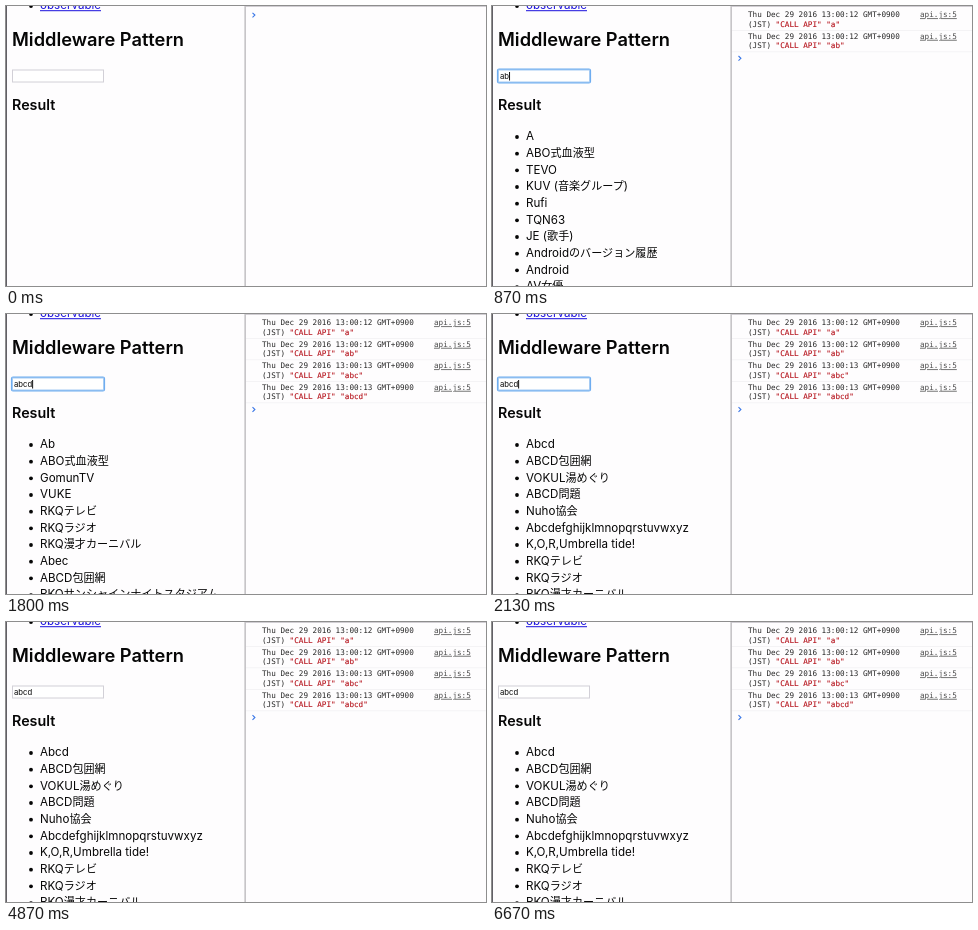
Animation of 480 by 280 pixels, one loop 6.74 s. Source, as an HTML page:

```html
<!DOCTYPE html>
<html lang="ja">
<head>
<meta charset="utf-8">
<title>Middleware Pattern</title>
<style>
html, body { margin: 0; width: 100%; height: 100%; overflow: hidden; background: #fefdfe; }
svg { display: block; width: 480px; height: 280px; }
text { font-family: Inter, "Noto Sans CJK JP", "Noto Sans CJK", sans-serif; fill: #060606; }
.head { font-weight: 600; }
.row { font-size: 11.1px; }
.latin { font-size: 11.6px; }
.field { font-size: 7.7px; }
.log { font-family: "DejaVu Sans Mono", monospace; font-size: 7.65px; fill: #262626; }
.str { fill: #b5121b; stroke: #b5121b; stroke-width: .12; }
.src { fill: #4c4c4c; text-decoration: underline; }
.link { fill: #1a10dc; }
</style>
</head>
<body>
<svg id="stage" viewBox="0 0 480 280">
  <defs>
    <filter id="soft" x="-10%" y="-40%" width="120%" height="180%"><feGaussianBlur stdDeviation=".5"/></filter>
  </defs>
  <rect width="480" height="280" fill="#fefdfe"/>
  <rect width="1" height="280" fill="#626066"/>
  <circle cx="25" cy="0" r="1.9"/>
  <text class="latin link" x="34" y="3.3">observable</text>
  <rect x="34" y="4.2" width="61" height="1" fill="#1a10dc"/>
  <text class="head" x="6" y="40" font-size="18.3">Middleware Pattern</text>
  <rect id="glow" x="5.8" y="63.3" width="92.4" height="13.4" rx="1.2" fill="none" stroke="#6fadf0" stroke-width="1.8" filter="url(#soft)"/>
  <rect id="box" x="6.5" y="64" width="91" height="12" fill="#fff"/>
  <text id="typed" class="field" x="8" y="73"></text>
  <rect id="caret" y="66" width="1" height="8.5" fill="#111"/>
  <text class="head" x="6" y="104.3" font-size="14.3">Result</text>
  <g id="lists"></g>
  <rect x="238.6" width="1" height="280" fill="#a3a1a5"/>
  <rect x="239" width="241" height=".8" fill="#c6c4c8"/>
  <g id="logs"></g>
  <path id="prompt" d="M246.5 6.8l2.4 2.3l-2.4 2.3" fill="none" stroke="#3b78e7" stroke-width="1.1"/>
</svg>
<script>
const LOOP = 6740, FOCUS = 130, BLUR = 4270, BLINK_FROM = 2270, BLINK = 500;
const WORD = "abcd";
const KEYS = [330, 730, 1130, 1470];
const RESULTS = [
  { at: 840, items: ["A", "ABO式血液型", "TEVO", "KUV (音楽グループ)", "Rufi", "TQN63", "JE (歌手)",
    "Androidのバージョン履歴", "Android", "AV女優"] },
  { at: 1330, items: ["Ab", "ABO式血液型", "GomunTV", "VUKE", "RKQテレビ", "RKQラジオ", "RKQ漫才カーニバル",
    "Abec", "ABCD包囲網", "RKQサンシャインナイトスタジアム"] },
  { at: 2000, items: ["Abcd", "ABCD包囲網", "VOKUL湯めぐり", "ABCD問題", "Nuho協会", "Abcdefghijklmnopqrstuvwxyz",
    "K,O,R,Umbrella tide!", "RKQテレビ", "RKQラジオ", "RKQ漫才カーニバル"] }
];

const $ = id => document.getElementById(id);
const show = (el, on) => el.setAttribute("visibility", on ? "visible" : "hidden");

function add(parent, tag, attrs, text = "") {
  const el = document.createElementNS("http://www.w3.org/2000/svg", tag);
  for (const k in attrs) el.setAttribute(k, attrs[k]);
  el.textContent = text;
  parent.appendChild(el);
  return el;
}

const lists = RESULTS.map(({ items }) => {
  const g = add($("lists"), "g", {});
  items.forEach((item, i) => {
    const y = 134.4 + i * 16.67;
    add(g, "circle", { cx: 25, cy: y - 3.4, r: 1.9, fill: "#060606" });
    const row = add(g, "text", { class: "row", x: 34, y });
    // Latin runs are set slightly larger than the Japanese ones
    for (const run of item.match(/[ -~]+|[^ -~]+/g))
      add(row, "tspan", { class: run < "\x7f" ? "latin" : "row" }, run);
  });
  return g;
});

const logs = KEYS.map((_, i) => {
  const g = add($("logs"), "g", { transform: `translate(0 ${i * 21.5})` });
  add(g, "text", { class: "log", x: 256, y: 11.3 }, `Thu Dec 29 2016 13:00:${i < 2 ? 12 : 13} GMT+0900`);
  const line = add(g, "text", { class: "log", x: 256, y: 20.5 }, "(JST) ");
  add(line, "tspan", { class: "str" }, `"CALL API" "${WORD.slice(0, i + 1)}"`);
  add(g, "text", { class: "log src", x: 428, y: 11.3 }, "api.js:5");
  add(g, "rect", { x: 240, y: 24, width: 240, height: .7, fill: "#f1f0f3" });
  return g;
});

function draw(t) {
  const count = KEYS.filter(k => t >= k).length;
  const current = RESULTS.filter(r => t >= r.at).length - 1;
  const focused = t >= FOCUS && t < BLUR;
  const blinkOn = t < BLINK_FROM || Math.floor((t - BLINK_FROM) / BLINK) % 2 === 1;

  $("typed").textContent = WORD.slice(0, count);
  $("caret").setAttribute("x", 8 + (count ? $("typed").getComputedTextLength() : 0));
  show($("caret"), focused && blinkOn);
  show($("glow"), focused);
  $("box").setAttribute("stroke", focused ? "#a5cbf3" : "#d2d0d7");
  lists.forEach((g, i) => show(g, i === current));
  logs.forEach((g, i) => show(g, i < count));
  $("prompt").setAttribute("transform", `translate(0 ${count * 21.6})`);
}

const start = performance.now();
function tick() {
  draw((performance.now() - start) % LOOP);
  requestAnimationFrame(tick);
}
tick();
</script>
</body>
</html>
```
